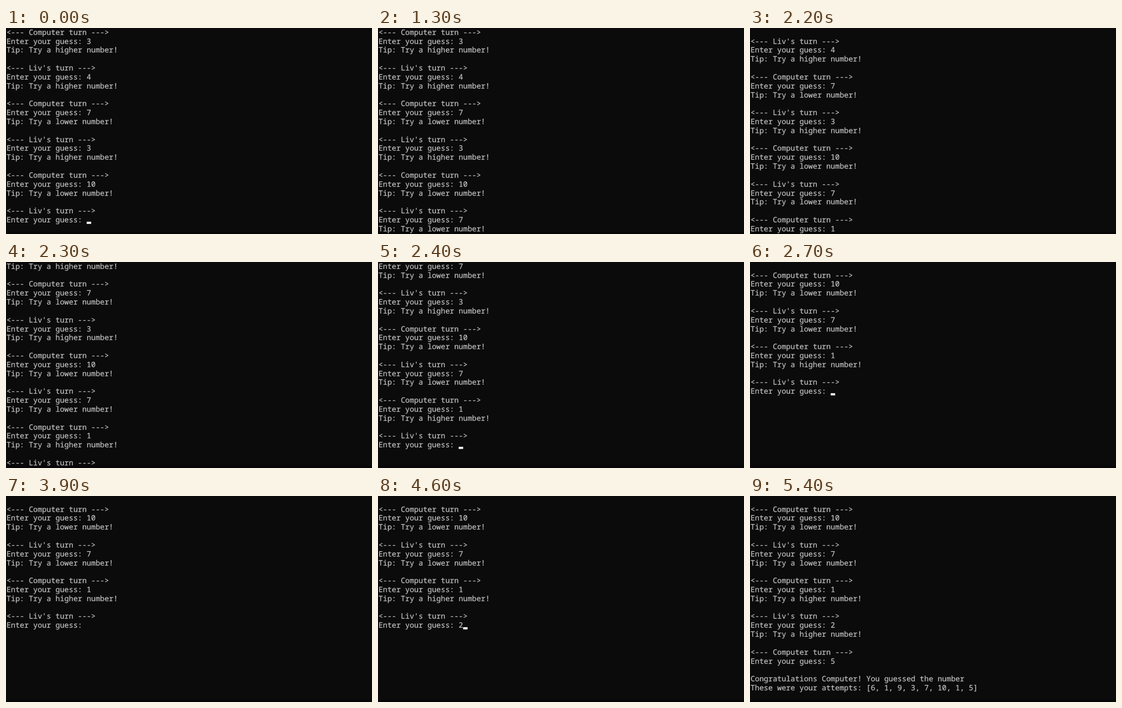
Write an HTML page with a canvas that moves like this. It is 690 by 388 pixels and loops after 8400 ms.

```html
<!DOCTYPE html>
<html lang="en">
<head>
<meta charset="utf-8">
<title>Guess the number</title>
<style>
  html, body { margin: 0; width: 100%; height: 100%; overflow: hidden; background: #0b0b0b; }
  canvas { display: block; }
</style>
</head>
<body>
<canvas id="stage" width="690" height="388"></canvas>
<script>
const ctx = document.getElementById('stage').getContext('2d');
const LOOP = 8400;
const CELL = 8.4, ROW = 16.82, LEFT = 0.9, BASE = 12.8, ROWS = 23;
const PLAYER = "Liv's turn", BOT = 'Computer turn';

const turn = (who, guess, tip) => [
  `<--- ${who} --->`,
  `Enter your guess: ${guess}`,
  tip ? `Tip: Try a ${tip} number!` : '',
  ''
];

const history = [
  ...turn(BOT, 3, 'higher'),
  ...turn(PLAYER, 4, 'higher'),
  ...turn(BOT, 7, 'lower'),
  ...turn(PLAYER, 3, 'higher'),
  ...turn(BOT, 10, 'lower')
];
const later = [
  ...turn(PLAYER, 7, 'lower'),
  ...turn(BOT, 1, 'higher')
];
const ending = [
  ...turn(PLAYER, 2, 'higher'),
  ...turn(BOT, 5).slice(0, 3),
  'Congratulations Computer! You guessed the number',
  'These were your attempts: [6, 1, 9, 3, 7, 10, 1, 5]'
];
const prompt = guess => turn(PLAYER, guess).slice(0, 2);

function output(t) {
  if (t < 1200) return [...history, ...prompt(t < 1000 ? '' : '7')];
  const lines = [...history, ...later];
  return lines.concat(t < 4900 ? prompt(t < 4600 ? '' : '2') : ending);
}

// The wheel moves three lines per notch, one notch every 100 ms.
const scrollTop = t => t < 2200 ? 0 : Math.min(15, 3 * (Math.floor((t - 2200) / 100) + 1));

function cursorOn(t) {
  if (t >= 4900) return false;
  const toggles = [200, 700, 2800, 3400, 3900, 4400];
  return toggles.filter(at => t >= at).length % 2 === 0;
}

function drawLine(text, row) {
  const y = BASE + row * ROW;
  [...text].forEach((ch, i) => {
    if (ch === ' ') return;
    const x = LEFT + i * CELL;
    ctx.fillText(ch, x, y);
    ctx.strokeText(ch, x, y);
  });
}

function draw(t) {
  ctx.fillStyle = '#0b0b0b';
  ctx.fillRect(0, 0, 690, 388);
  ctx.fillStyle = '#070707';
  ctx.fillRect(0, 384, 690, 4);

  // A hairline outline gives the type the weight of a console font.
  ctx.font = '14px "Noto Sans Mono", "DejaVu Sans Mono", monospace';
  ctx.textRendering = 'geometricPrecision';
  ctx.fillStyle = '#c4c4c4';
  ctx.strokeStyle = 'rgba(196, 196, 196, 0.6)';
  ctx.lineWidth = 0.35;
  ctx.lineJoin = 'round';
  const lines = output(t), top = scrollTop(t);
  lines.slice(top, top + ROWS).forEach(drawLine);

  const last = lines.length - 1, row = last - top;
  if (cursorOn(t) && row < ROWS) {
    ctx.fillStyle = '#f2f2f2';
    ctx.fillRect(LEFT + lines[last].length * CELL, BASE + row * ROW - 1.2, CELL, 4.2);
  }
}

const start = performance.now();
function tick() {
  draw((performance.now() - start) % LOOP);
  requestAnimationFrame(tick);
}
tick();
</script>
</body>
</html>
```
